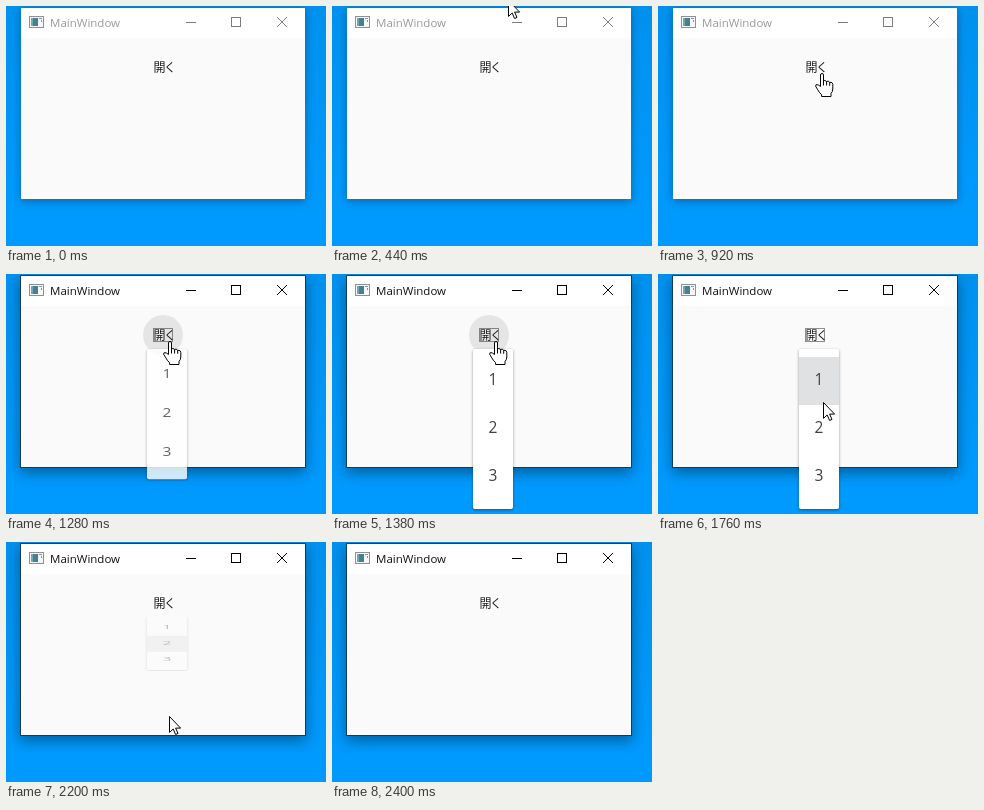
Recreate the animation shown at these times as an HTML page. Size 320 px wide and 240 px high, loop 2900 ms.

```html
<!DOCTYPE html>
<html lang="ja">
<head>
<meta charset="utf-8">
<title>MainWindow</title>
<style>
  html, body { margin: 0; width: 100%; height: 100%; overflow: hidden; background: #0098fb; }
  svg { display: block; width: 100vw; height: 100vh; }
  .title { font: 11.5px "Open Sans", "Noto Sans", sans-serif; }
  .label { font: 500 12px "Noto Sans CJK JP", "Noto Sans CJK", sans-serif; fill: #1c1c1c; }
  .item { font: 15.5px "Open Sans", "Noto Sans", sans-serif; fill: #404040; text-anchor: middle; }
  .buttons { fill: none; stroke-width: 1; }
  .pointer { fill: #fff; stroke: #000; stroke-width: 1; stroke-linejoin: round; }
</style>
</head>
<body>
<svg viewBox="0 0 320 240" preserveAspectRatio="none">
  <defs>
    <linearGradient id="sky" x1="0" y1="0" x2="0" y2="1">
      <stop offset="0" stop-color="#0091ee"/>
      <stop offset=".7" stop-color="#0098fa"/>
      <stop offset="1" stop-color="#009aff"/>
    </linearGradient>
    <filter id="soft" x="-20%" y="-20%" width="140%" height="140%"><feGaussianBlur stdDeviation="4"/></filter>
    <filter id="wide" x="-20%" y="-20%" width="140%" height="140%"><feGaussianBlur stdDeviation="7"/></filter>
    <filter id="near" x="-30%" y="-20%" width="160%" height="140%"><feGaussianBlur stdDeviation="1.4"/></filter>
  </defs>

  <rect width="320" height="240" fill="url(#sky)"/>
  <rect id="idleShadow" x="15" y="3" width="284" height="192" opacity=".32" filter="url(#soft)"/>
  <rect id="liveShadow" x="14" y="6" width="286" height="193" opacity=".36" filter="url(#wide)"/>

  <rect id="border" x="14" y="1" width="286" height="193" fill="#123c5c"/>
  <rect x="15" y="2" width="284" height="191" fill="#fff"/>
  <rect x="15" y="32" width="284" height="161" fill="#fafafa"/>

  <g shape-rendering="crispEdges">
    <rect x="23.5" y="10.5" width="14" height="11" fill="#f4f6f7" stroke="#8b9196"/>
    <rect x="25" y="12" width="7" height="8" fill="#477f8c"/>
    <rect x="25" y="12" width="2" height="8" fill="#76a7b0"/>
    <rect x="33" y="12" width="3" height="1" fill="#87939b"/>
    <rect x="35" y="14" width="1" height="2" fill="#87939b"/>
  </g>
  <text id="title" class="title" x="44" y="21">MainWindow</text>
  <g id="buttons" class="buttons">
    <path d="M180 16.5h10M225.5 11.5h9v9h-9z" shape-rendering="crispEdges"/>
    <path d="M271 11l10 10M281 11l-10 10"/>
  </g>

  <circle id="ripple" cx="157" cy="61" fill="#e5e5e5"/>
  <text class="label" x="147.5" y="66">開<tspan dx="-1.5">く</tspan></text>
  <rect id="focus" x="147.5" y="54.5" width="19" height="13" fill="none" stroke="#222" stroke-dasharray="1 1"/>

  <g id="popup">
    <rect x="141" y="76" width="40" height="160" rx="2" opacity=".4" filter="url(#near)"/>
    <rect x="141" y="75" width="40" height="160" rx="2" fill="#fff"/>
    <rect id="hover" x="141" width="40" height="48" fill="#e0e1e3"/>
    <text class="item" x="161" y="111">1</text>
    <text class="item" x="161" y="159">2</text>
    <text class="item" x="161" y="207">3</text>
  </g>

  <path id="arrow" class="pointer" d="M.5 .5V16.4L4.2 13L6.6 18.5L9 17.4L6.6 12.1H11.6Z"/>
  <path id="hand" class="pointer" d="M-.5 13.5V2Q-.5 .5 1 .5T2.5 2V8Q3.8 6.6 5.6 8.5Q7.2 7.4 8.7 9.3Q11.5 8.8 11.8 11.3V16Q11.8 18.5 10 20.5V23.5H.6V21.8Q-1.8 19.5-3.6 16.2L-5.3 13.3Q-5.6 11.5-4 11.6Q-2.4 11.8-.5 13.5ZM2.5 8V12.5M5.6 8.5V12.5M8.7 9.3V12.8"/>
</svg>

<script>
const LOOP = 2900, TICK = 20;
const el = id => document.getElementById(id);
const set = (id, name, value) => el(id).setAttribute(name, value);
const show = (id, on) => set(id, "visibility", on ? "visible" : "hidden");

// time, x, y of the pointer tip
const path = [
  [440, 176, -6], [500, 146, 1], [560, 117, 4], [620, 105, 7],
  [660, 111, 11], [720, 111, 11], [780, 124, 25], [840, 145, 47],
  [880, 157, 61], [920, 163, 67], [1720, 163, 67],
  [1740, 166, 92], [1760, 165, 128], [1800, 165, 141], [1860, 164, 162],
  [1920, 163, 174], [2360, 163, 174], [2380, 210, 174], [2400, 210, 174]
];

const ramp = (t, from, to) => Math.min(1, Math.max(0, (t - from) / (to - from)));
const easeOut = k => 1 - (1 - k) ** 3;

function pointerAt(t) {
  const i = path.findIndex(p => p[0] > t);
  if (i < 1) return null;
  const [t0, x0, y0] = path[i - 1], [t1, x1, y1] = path[i];
  const k = (t - t0) / (t1 - t0);
  return [Math.round(x0 + (x1 - x0) * k), Math.round(y0 + (y1 - y0) * k)];
}

function drawPointer(t) {
  const p = pointerAt(t);
  const onButton = p && t < 1740 && Math.hypot(p[0] - 157, p[1] - 61) < 20;
  show("arrow", p && !onButton);
  show("hand", onButton);
  if (p) set(onButton ? "hand" : "arrow", "transform", `translate(${p})`);
  const row = p && t >= 1740 ? Math.floor((p[1] - 83) / 48) : -1;
  show("hover", row >= 0 && t < 2240);
  set("hover", "y", 83 + 48 * Math.max(0, row));
}

function drawWindow(t) {
  const live = t >= 1160;
  show("idleShadow", !live);
  show("liveShadow", live);
  show("border", live);
  set("title", "fill", live ? "#111" : "#999");
  set("buttons", "stroke", live ? "#000" : "#7d7d7d");
}

function drawPopup(t) {
  const open = easeOut(ramp(t, 1220, 1360)) * (1 - ramp(t, 2120, 2240));
  show("popup", open > 0);
  set("popup", "opacity", open);
  set("popup", "transform", `translate(0 75) scale(1 ${open}) translate(0 -75)`);
  show("focus", t >= 1260 && t < 2080);
  set("ripple", "r", 20 * easeOut(ramp(t, 1140, 1300)));
  set("ripple", "opacity", 1 - ramp(t, 1380, 1540));
}

function frame(now) {
  const t = Math.floor((now - start) % LOOP / TICK) * TICK;
  drawWindow(t);
  drawPopup(t);
  drawPointer(t);
  requestAnimationFrame(() => frame(performance.now()));
}

const start = performance.now();
frame(start);
</script>
</body>
</html>
```
